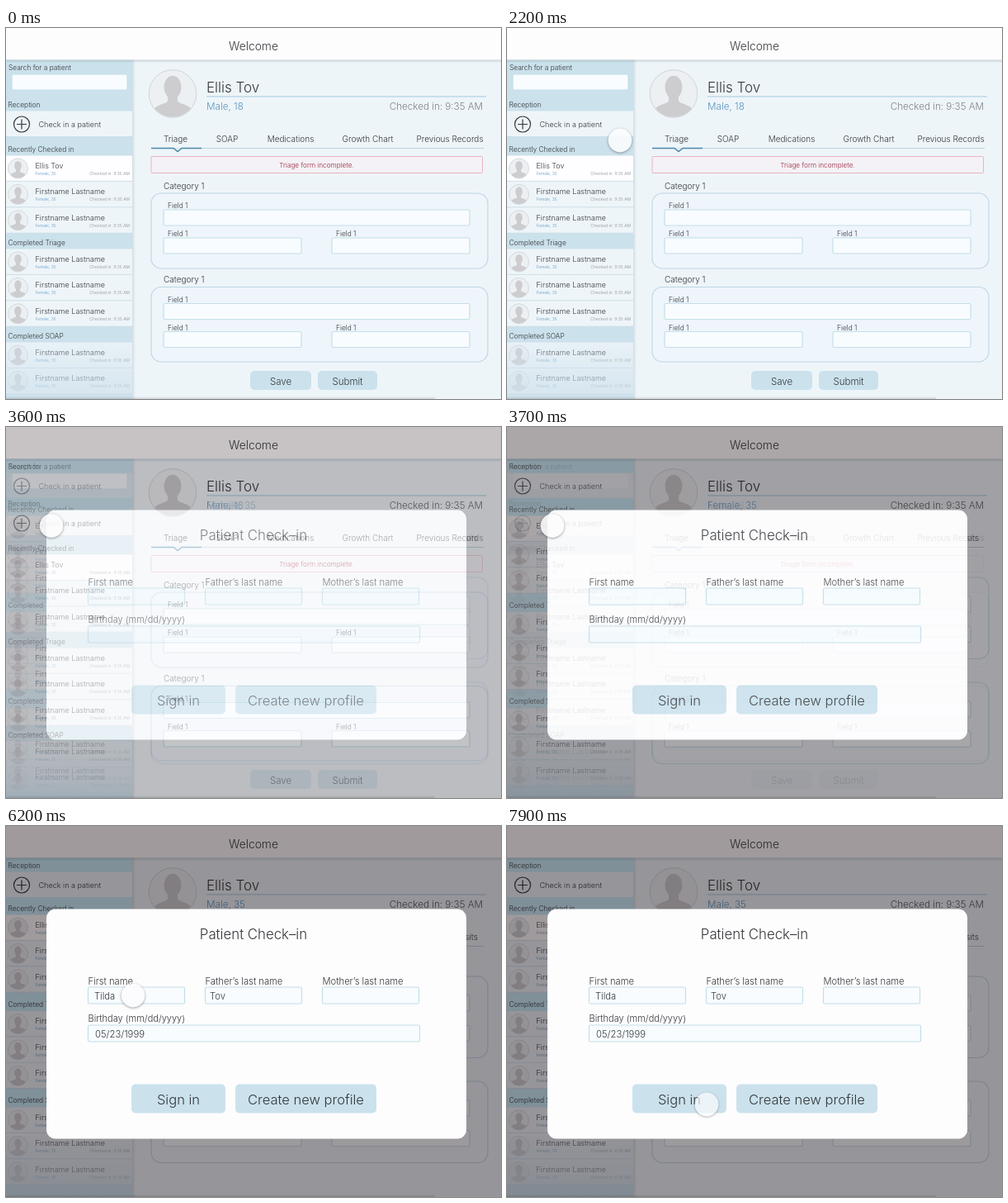
An HTML page that plays this animation: 600x449 px, repeating every 8 s.

```html
<!DOCTYPE html>
<html lang="en">
<head>
<meta charset="utf-8">
<title>Patient check-in</title>
<style>
  html, body { margin: 0; width: 100%; height: 100%; overflow: hidden; background: #fefdfe; }
  svg { display: block; width: 100vw; height: 100vh; }
  text { font-family: Inter, "Noto Sans CJK SC", "Liberation Sans", sans-serif; font-weight: 300; white-space: pre; }
</style>
</head>
<body>
<svg id="stage" viewBox="0 0 600 449" xmlns="http://www.w3.org/2000/svg"></svg>
<script>
const LOOP = 8000, TICK = 100;
const INK = '#34373b', BLUE = '#5b94bd', PALE = '#cbe1eb', PANEL = '#eef5f9';
const PATIENT = 'Ellis Tov';

// y is the middle of the capital letters
const text = (x, y, size, str, { fill = INK, anchor = 'start', extra = '' } = {}) =>
  `<text x="${x}" y="${y + size * 0.36}" font-size="${size}" fill="${fill}" text-anchor="${anchor}" ${extra}>${str}</text>`;
const rect = (x, y, w, h, fill, extra = '') =>
  `<rect x="${x}" y="${y}" width="${w}" height="${h}" fill="${fill}" ${extra}/>`;
const line = (x1, y, x2, color, width = 1) =>
  `<path d="M${x1} ${y}H${x2}" stroke="${color}" stroke-width="${width}" fill="none"/>`;
const field = (x, y, w, h = 19) =>
  rect(x, y, w, h, '#f8fcff', 'rx="1.5" stroke="#c3e0e8" stroke-width="1.2"');
const button = (x, y, w, h, label, size) =>
  rect(x, y, w, h, '#cbe2ed', 'rx="5"') + text(x + w / 2, y + h / 2 + 1, size, label, { anchor: 'middle' });

const avatar = (x, y, r) => `
  <g transform="translate(${x} ${y}) scale(${r / 29})">
    <circle r="29" fill="#ecf0f3"/>
    <g clip-path="url(#disc)" fill="#cdcdcf">
      <ellipse cy="-8" rx="10.5" ry="14"/>
      <path d="M-6 0V9C-9 13-21 13-23 20V30H23V20C21 13 9 13 6 9V0Z"/>
    </g>
    <circle r="29" fill="none" stroke="#cfd4d8" stroke-width="${r > 20 ? 1 : 2}"/>
  </g>`;

const ROW = 31.4;
const patientRow = (y, name, selected) =>
  rect(0, y, 153, ROW - 0.6, selected ? '#fefdff' : PANEL) +
  line(0, y + ROW - 0.5, 153, '#cfdee7') +
  avatar(14.5, y + 15.5, 12) +
  text(35.5, y + 12, 9, name) +
  text(35.5, y + 21.5, 4.9, 'Female, 35', { fill: BLUE }) +
  text(150, y + 21.5, 5, 'Checked in: 9:35 AM', { fill: '#85898e', anchor: 'end' });

const patientList = (title, titleY, top, count, selected) => {
  let out = text(2.5, titleY, 8.4, title);
  for (let i = 0; i < count; i++) {
    const first = selected && i === 0;
    out += patientRow(top + i * ROW, first ? selected : 'Firstname Lastname', first);
  }
  return out;
};

const checkInRow = y => `
  ${rect(0, y, 153, 30.5, PANEL)}
  <g fill="none" stroke="${INK}" stroke-width="1.2">
    <circle cx="19" cy="${y + 16}" r="9.5"/>
    <path d="M13 ${y + 16}h12M19 ${y + 10}v12"/>
  </g>
  ${text(39.5, y + 16.3, 9.05, 'Check in a patient')}`;

const sidebar = (color, content) => `
  ${rect(0, 38, 153, 411, color)}${content}
  ${rect(0, 375, 153, 74, 'url(#fade)')}
  ${rect(153, 38, 4, 411, 'url(#sideShadow)')}`;

const header = () => `
  ${rect(0, 0, 600, 38.5, '#fefdfe')}
  ${rect(0, 38.5, 600, 4, 'url(#topShadow)')}
  ${text(300, 22.5, 13.8, 'Welcome', { anchor: 'middle' })}
  ${rect(0, 446, 520, 3, 'url(#bottomShade)')}`;

const profile = (details, lastTab, muted) => {
  const tabs = [[205.5, 'Triage'], [268, 'SOAP'], [345, 'Medications'], [438.5, 'Growth Chart'], [538, lastTab]];
  return rect(153, 38, 447, 411, PANEL) +
    avatar(202, 79.5, 28.8) +
    text(243, 71.5, 17, PATIENT) +
    line(243, 83, 582, '#bbd8e7', 1.6) + details +
    text(578, 94.5, 11.65, 'Checked in: 9:35 AM', { fill: muted, anchor: 'end' }) +
    tabs.map(([x, label]) => text(x, 134.5, 10, label, { anchor: 'middle' })).join('') +
    line(176, 145.5, 579, '#b9d2df') +
    `<path d="M176 145.5H203L208 149.5L213 145.5H237" stroke="#4a86a8" stroke-width="1.4" fill="${PANEL}"/>`;
};

const category = (titleY, top, height, row1, row2) =>
  text(191, titleY, 10, 'Category 1') +
  rect(176, top, 408, height, '#eef5fb', 'rx="12" stroke="#bdd6e5" stroke-width="1.1"') +
  [[191, row1, 371], [191, row2, 167], [395, row2, 167]].map(([x, y, w]) =>
    text(x + 5, y - 5, 8.4, 'Field 1') + field(x, y, w)).join('');

const formScreen = () =>
  profile(text(243, 94.5, 11.7, 'Male, 18', { fill: BLUE }), 'Previous Records', '#7d8287') +
  rect(176, 155.5, 401.5, 20, '#f4f2f6', 'rx="1" stroke="#e8b4c1"') +
  text(376.5, 166.5, 8.2, 'Triage form incomplete.', { fill: '#9a2840', anchor: 'middle' }) +
  category(191, 200, 91, 220, 254) +
  category(304, 313.5, 90.5, 333.5, 367.5) +
  button(296, 415, 74, 23, 'Save', 11.5) +
  button(378, 415, 72, 23, 'Submit', 11.5) +
  sidebar(PALE,
    text(3, 47.5, 8.4, 'Search for a patient') + field(7, 56, 140) +
    text(2.5, 92.5, 8.4, 'Reception') + checkInRow(100.5) +
    patientList('Recently Checked in', 146.5, 154.5, 3, PATIENT) +
    patientList('Completed Triage', 259.5, 267.5, 3) +
    patientList('Completed SOAP', 372.5, 380.5, 2)) +
  header();

const dimmedScreen = () =>
  profile(
    text(243, 94.5, 11.7, 'Female, 35', { fill: BLUE, extra: 'id="female"' }) +
    text(243, 94.5, 11.7, 'Male, 35', { fill: BLUE, extra: 'id="male"' }),
    'Previous Visits', '#565a5f') +
  category(173, 182, 98.5, 205, 241.5) +
  category(300, 309, 98.5, 332, 368.5) +
  sidebar('#c8ecfa',
    text(2.5, 48, 8.4, 'Reception') + checkInRow(55.5) +
    patientList('Recently Checked in', 100, 107.5, 3, PATIENT) +
    patientList('Completed Triage', 216, 224, 3) +
    patientList('Completed SOAP', 332, 340.5, 3)) +
  header() +
  rect(0, 0, 600, 449, '#120608', 'opacity=".4"');

const dialog = () =>
  rect(49, 100.5, 509, 278, '#fefdfe', 'rx="11"') +
  text(300, 131, 16.8, 'Patient Check–in', { anchor: 'middle' }) +
  [[99.5, 'First name'], [241.5, 'Father’s last name'], [383.5, 'Mother’s last name']].map(([x, label]) =>
    text(x, 188, 11.2, label) + field(x, 195, 117, 20)).join('') +
  text(99.5, 233, 11, 'Birthday (mm/dd/yyyy)') + field(99.5, 241, 402, 20) +
  `<g id="values">
    ${text(107, 205.5, 11.2, 'Tilda')}${text(247, 205.5, 11.2, 'Tov')}${text(108, 251.5, 11.3, '05/23/1999')}
  </g>` +
  button(152, 312.5, 114, 35, 'Sign in', 16.5) +
  button(278, 312.5, 171, 35, 'Create new profile', 16.5);

const gradient = (id, dir, color, from, to) => `
  <linearGradient id="${id}" x2="${dir === 'x' ? 1 : 0}" y2="${dir === 'y' ? 1 : 0}">
    <stop stop-color="${color}" stop-opacity="${from}"/>
    <stop offset="1" stop-color="${color}" stop-opacity="${to}"/>
  </linearGradient>`;

document.getElementById('stage').innerHTML = `
  <defs>
    <clipPath id="disc"><circle r="28.5"/></clipPath>
    ${gradient('topShadow', 'y', '#6f8490', 0.28, 0)}
    ${gradient('sideShadow', 'x', '#6f8490', 0.22, 0)}
    ${gradient('fade', 'y', '#cfe1ec', 0.15, 0.8)}
    ${gradient('bottomShade', 'y', '#3a4045', 0, 0.2)}
    <filter id="soft" x="-30%" y="-30%" width="160%" height="160%">
      <feDropShadow dx="0" dy="0.8" stdDeviation="1.4" flood-color="#3c4046" flood-opacity=".7"/>
    </filter>
  </defs>
  ${formScreen()}
  <g id="checkIn">${dimmedScreen()}${dialog()}</g>
  <g id="touch"><circle r="14.2" fill="#fdfdfe" filter="url(#soft)"/></g>`;

// time, x, y of the touch point
const PATH = [
  [400, 242, 24], [500, 226, 24], [650, 226, 24], [900, 212, 50], [1150, 170, 92],
  [1500, 109, 126], [1750, 109, 126], [2000, 124, 146], [2200, 137, 136], [2400, 105, 124],
  [2600, 68, 119], [2800, 55, 119.5], [4050, 55, 119.5],
  [4150, 50, 106], [4300, 130, 96], [4450, 330, 150], [4600, 490, 230], [4700, 512, 285],
  [4800, 470, 322], [4900, 390, 315], [5000, 320, 280], [5300, 199, 227], [5500, 154, 205],
  [6450, 154, 205], [6800, 200, 255], [7100, 275, 325], [7300, 306, 336], [7600, 242, 337],
  [8000, 242, 337]
];

// Velocity at a waypoint; zero where the touch rests
function slope(i, axis) {
  const a = PATH[i - 1], b = PATH[i], c = PATH[i + 1];
  if (!a || !c) return 0;
  const still = (p, q) => p[1] === q[1] && p[2] === q[2];
  return still(a, b) || still(b, c) ? 0 : (c[axis] - a[axis]) / (c[0] - a[0]);
}

function touchAt(t, axis) {
  const i = Math.max(0, PATH.findLastIndex(p => p[0] <= t));
  const a = PATH[i], b = PATH[i + 1];
  const d = b[0] - a[0], u = Math.max(0, (t - a[0]) / d), v = 1 - u;
  return v * v * (1 + 2 * u) * a[axis] + u * u * (3 - 2 * u) * b[axis] +
    d * u * v * (v * slope(i, axis) - u * slope(i + 1, axis));
}

const easeOut = (t, start, span) => {
  const u = Math.min(1, Math.max(0, (t - start) / span));
  return 1 - (1 - u) ** 3;
};
const within = (t, from, to) => t >= from && t < to;
const $ = id => document.getElementById(id);
const [checkIn, values, female, male, touch] = ['checkIn', 'values', 'female', 'male', 'touch'].map($);

function render(t) {
  const filled = easeOut(t, 5750, 450);
  const pressed = within(t, 3300, 3600) || within(t, 5800, 5900) || t >= 7900;
  checkIn.setAttribute('opacity', easeOut(t, 3500, 400));
  values.setAttribute('opacity', filled);
  male.setAttribute('opacity', filled);
  female.setAttribute('opacity', 1 - filled);
  touch.setAttribute('transform', `translate(${touchAt(t, 1)} ${touchAt(t, 2)})`);
  touch.setAttribute('opacity', t < 400 ? 0 : pressed ? 0.68 : 0.86);
}

const start = performance.now();
function frame() {
  const t = (performance.now() - start) % LOOP;
  render(Math.floor(t / TICK) * TICK);
  requestAnimationFrame(frame);
}
frame();
</script>
</body>
</html>
```
